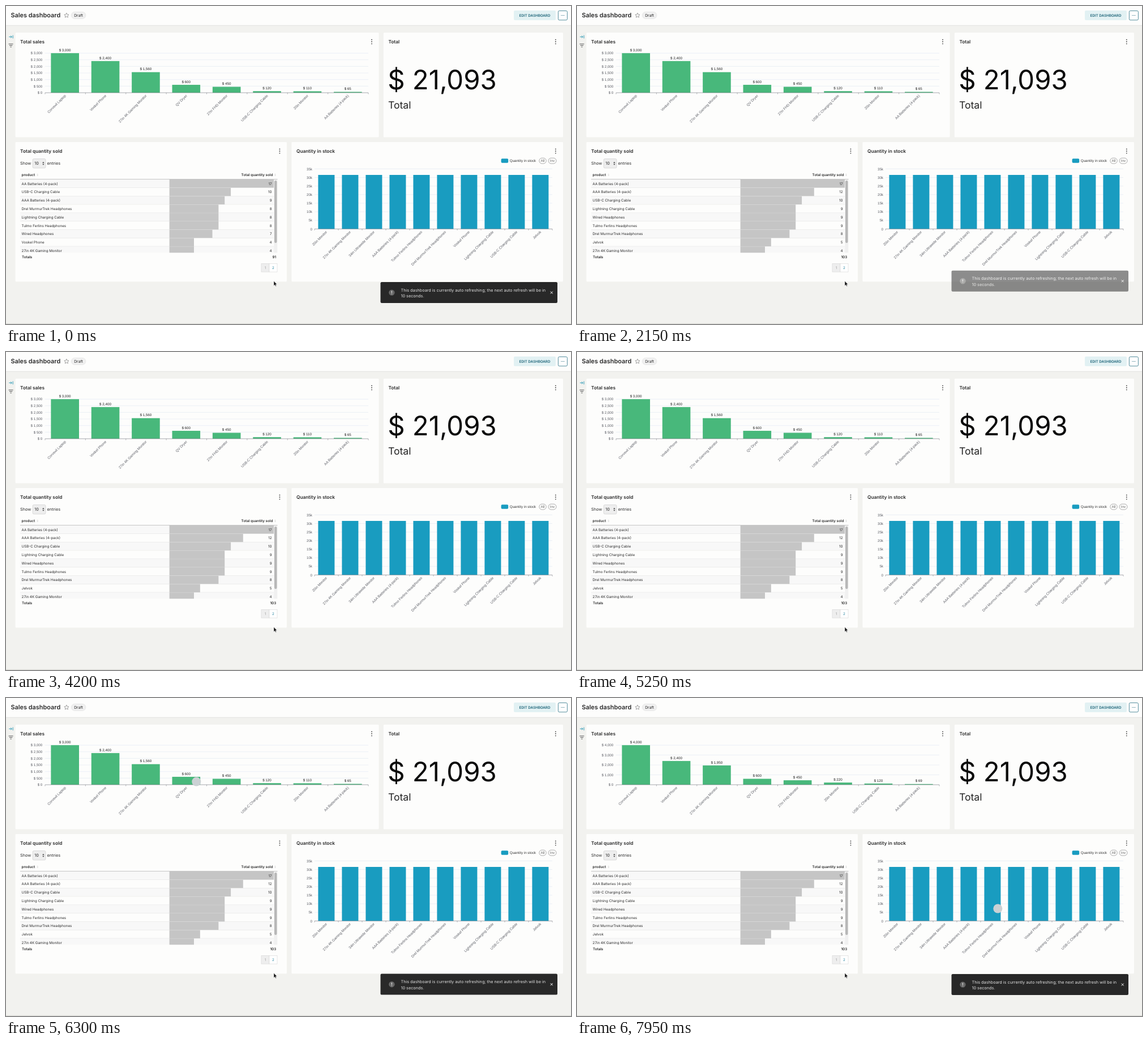
An HTML page that plays this animation: 998 px wide and 561 px high, repeating every 8000 ms.

```html
<!DOCTYPE html>
<html lang="en">
<head>
<meta charset="utf-8">
<title>Sales dashboard</title>
<style>
  html, body { margin: 0; width: 100%; height: 100%; overflow: hidden; background: #f2f2ef; }
  svg { display: block; width: 100vw; height: 100vh; }
  text { font-family: Inter, "Open Sans", sans-serif; font-optical-sizing: none; text-rendering: geometricPrecision; white-space: pre; }
  .chart { font-family: "Liberation Sans", Arial, sans-serif; }
</style>
</head>
<body>
<svg id="stage" viewBox="0 0 998 561" xmlns="http://www.w3.org/2000/svg">
  <g id="page"></g>
  <g id="sales"></g>
  <g id="table"></g>
  <circle id="spinner" r="8" fill="#cbd1d4"/>
  <g id="toast"></g>
  <path d="M473 485.3v8.3l1.9-1.7 1.3 2.7 1.3-.6-1.3-2.7h2.5z" fill="#111" stroke="#fff" stroke-width=".5"/>
</svg>
<script>
const LOOP = 8000;
const SMALL = 6.24, BASE = 7.28, HEAD = 8.32;
const INK = '#2b2b2b', AXIS = '#6e7079', TICK = '#5c5e66', GREEN = '#48b87b', BLUE = '#199cc0';
const PAGE = '#f2f2ef', PAPER = '#fdfdfc';
const $ = id => document.getElementById(id);

const rect = (x, y, w, h, fill, more = '') =>
  `<rect x="${x}" y="${y}" width="${w}" height="${h}" fill="${fill}" ${more}/>`;
const line = (x1, y1, x2, y2, color, width = .6) =>
  `<path d="M${x1} ${y1}L${x2} ${y2}" stroke="${color}" stroke-width="${width}" fill="none"/>`;
const path = (d, fill, more = '') => `<path d="${d}" fill="${fill}" ${more}/>`;
const dot = (x, y, r, fill) => `<circle cx="${x}" cy="${y}" r="${r}" fill="${fill}"/>`;

// Text centred vertically on cy
const text = (x, cy, s, size = SMALL, { fill = INK, weight = 400, anchor = 'start', more = '' } = {}) =>
  `<text x="${x}" y="${cy + size * .36}" font-size="${size}" font-weight="${weight}" fill="${fill}" text-anchor="${anchor}" ${more}>${s}</text>`;
const label = (x, cy, s, anchor, fill = TICK, more = '') =>
  text(x, cy, s, SMALL, { fill, anchor, more: 'class="chart" ' + more });
const slanted = (x, y, s) => label(x, y, s, 'end', TICK, `transform="rotate(-45 ${x} ${y})"`);

const kebab = (x, y) => [-3.6, 0, 3.6].map(d => dot(x, y + d, .95, '#444')).join('');
const card = (x, y, w, h, title) =>
  rect(x, y, w, h, PAPER, 'rx="1.5"') +
  text(x + 8.6, y + 16.2, title, HEAD, { weight: 600 });

function star(cx, cy, r) {
  const pts = Array.from({ length: 10 }, (_, i) => {
    const a = Math.PI * (i / 5 - .5), d = i % 2 ? r * .48 : r;
    return `${(cx + d * Math.cos(a)).toFixed(2)},${(cy + d * Math.sin(a)).toFixed(2)}`;
  });
  return `<polygon points="${pts.join(' ')}" fill="none" stroke="#777" stroke-width=".7" stroke-linejoin="round"/>`;
}

const sorter = (x, y) =>
  path(`M${x - 1.1} ${y - .6}h2.2l-1.1-1.4zM${x - 1.1} ${y + .6}h2.2l-1.1 1.4z`, '#c4c4c4');

function header() {
  return rect(0, 0, 998, 34, PAPER) +
    line(0, 34.3, 998, 34.3, '#dfdfdd', .8) +
    text(8.4, 16.4, 'Sales dashboard', 10.92, { weight: 600 }) +
    star(106.9, 16.6, 4.3) +
    rect(115.3, 10.4, 25.6, 12, '#f0f0f0', 'rx="6" stroke="#dadada" stroke-width=".5"') +
    text(128.1, 16.4, 'Draft', 6.76, { anchor: 'middle' }) +
    rect(897, 8, 74, 17, '#e2f1f3', 'rx="2"') +
    text(934, 16.4, 'EDIT DASHBOARD', SMALL, { weight: 600, fill: '#1b6377', anchor: 'middle' }) +
    rect(975.4, 8.5, 16, 16.3, '#fff', 'rx="2" stroke="#2a7186" stroke-width=".8"') +
    [-2.3, 0, 2.3].map(d => dot(983.4 + d, 16.6, .65, '#1b6377')).join('');
}

function sidebar() {
  return path('M5.2 54.4h5M8.2 52.4l2.1 2-2.1 2M12.2 51.6v5.6', 'none', 'stroke="#2497b5" stroke-width=".9"') +
    [[4, -2.6], [2.7, 0], [1.2, 2.6]].map(([w, d]) => line(8.6 - w, 69.6 + d, 8.6 + w, 69.6 + d, '#444', .9)).join('');
}

function stockChart() {
  const names = ['20in Monitor', '27in 4K Gaming Monitor', '34in Ultrawide Monitor', 'AAA Batteries (4-pack)',
    'Tulmo Ferlins Headphones', 'Drel MurmurTrek Headphones', 'Voskel Phone', 'Lightning Charging Cable',
    'USB-C Charging Cable', 'Jelvok'];
  const left = 545, right = 965, base = 393.3, step = 42;
  let s = rect(874.6, 269.2, 12.6, 7.6, BLUE, 'rx="1.8"') +
    label(889.8, 273.1, 'Quantity in stock', 'start', '#333');
  for (const [x, w, name] of [[948, 12.4, 'All'], [965, 14, 'Inv']])
    s += rect(x - w / 2, 268.2, w, 9.8, 'none', 'rx="4.9" stroke="#777" stroke-width=".6"') +
      label(x, 273.1, name, 'middle', '#666');
  for (let i = 0; i <= 7; i++) {
    const y = base - i * 15.13;
    if (i) s += line(left, y, right, y, '#e0e6f1');
    s += label(541, y, i ? i * 5 + 'k' : '0', 'end');
  }
  names.forEach((name, i) => {
    const x = left + step * (i + .5);
    s += rect(x - 14.6, 298, 29, base - 298, BLUE) + slanted(x, base + 4.2, name);
  });
  s += line(left, base, right, base, AXIS);
  for (let i = 0; i <= 10; i++) s += line(left + i * step, base, left + i * step, base + 2.6, AXIS, .5);
  return s;
}

function tableFrame() {
  return text(25, 277.5, 'Show', BASE) +
    rect(47.2, 269.6, 22.8, 16.3, '#eeeeee', 'rx="2" stroke="#c8c8c8" stroke-width=".6"') +
    text(50.2, 277.8, '10', BASE) +
    path('M64.2 277.1h3.4l-1.7-2.3zM64.2 278.5h3.4l-1.7 2.3z', '#444') +
    text(72.6, 277.5, 'entries', BASE) +
    text(27.6, 297.9, 'product', SMALL, { weight: 600 }) + sorter(55.8, 297.9) +
    text(471.3, 297.9, 'Total quantity sold', SMALL, { weight: 600, anchor: 'end' }) + sorter(475.6, 297.9) +
    text(28, 443, 'Totals', SMALL, { weight: 600 }) +
    rect(451, 454.3, 14, 14.8, '#eeeeee', 'stroke="#d5d5d5" stroke-width=".6"') +
    rect(465, 454.3, 14, 14.8, '#fff', 'stroke="#d5d5d5" stroke-width=".6"') +
    text(458, 461.7, '1', SMALL, { fill: '#999', anchor: 'middle' }) +
    text(472, 461.7, '2', SMALL, { fill: '#2483a0', anchor: 'middle' });
}

function tableRows({ rows, total }) {
  const top = 306, pitch = 14.78;
  let s = '<clipPath id="body"><rect x="25" y="305" width="455" height="130.3"/></clipPath><g clip-path="url(#body)">';
  rows.forEach(([name, n], i) => {
    const y = top + i * pitch, mid = y + 7.4;
    s += rect(25, y, 448.5, pitch, i % 2 ? PAPER : '#f8f8f8') +
      rect(288.6, y, n * 10.85, pitch, '#c5c5c5') +
      line(25, y + pitch, 473.5, y + pitch, '#d0d0d0', .6) +
      text(27.6, mid, name) + text(469.5, mid, n, SMALL, { anchor: 'end' });
  });
  return s + rect(473.4, top, 5.8, 130, '#f0f0f0') + rect(474, 308, 4.5, 110, '#b8b8b8', 'rx="2.2"') + '</g>' +
    line(25, 305.6, 479.5, 305.6, '#b5b5b5', .8) +
    text(477.2, 443, total, SMALL, { weight: 600, anchor: 'end' });
}

const TABLES = [
  { total: 91, rows: [['AA Batteries (4-pack)', 17], ['USB-C Charging Cable', 10], ['AAA Batteries (4-pack)', 9],
    ['Drel MurmurTrek Headphones', 8], ['Lightning Charging Cable', 8], ['Tulmo Ferlins Headphones', 8],
    ['Wired Headphones', 7], ['Voskel Phone', 4], ['27in 4K Gaming Monitor', 4]] },
  { total: 103, rows: [['AA Batteries (4-pack)', 17], ['AAA Batteries (4-pack)', 12], ['USB-C Charging Cable', 10],
    ['Lightning Charging Cable', 9], ['Wired Headphones', 9], ['Tulmo Ferlins Headphones', 9],
    ['Drel MurmurTrek Headphones', 8], ['Jelvok', 5], ['27in 4K Gaming Monitor', 4]] }
];

const LEADERS = ['Corvexil Laptop', 'Voskel Phone', '27in 4K Gaming Monitor', 'QV Dryer', '27in FHD Monitor'];
const SALES = [
  { max: 3000, tick: 500, values: [3000, 2400, 1560, 600, 450, 120, 110, 65],
    names: [...LEADERS, 'USB-C Charging Cable', '20in Monitor', 'AA Batteries (4-pack)'] },
  { max: 4000, tick: 1000, values: [4000, 2400, 1950, 600, 450, 220, 120, 69],
    names: [...LEADERS, '20in Monitor', 'USB-C Charging Cable', 'AA Batteries (4-pack)'] }
];
const money = n => '$ ' + n.toLocaleString('en-US');

// k blends the bar heights from the first data set to the second
function salesChart(k) {
  const left = 69, right = 640, base = 153, height = 69.8, step = (right - left) / 8;
  const data = SALES[k > 0 ? 1 : 0];
  let s = '';
  for (let v = 0; v <= data.max; v += data.tick) {
    const y = base - height * v / data.max;
    if (v) s += line(left, y, right, y, '#e0e6f1');
    s += label(64.3, y, money(v), 'end');
  }
  data.names.forEach((name, i) => {
    const [a, b] = SALES.map(d => d.values[i] / d.max);
    const x = left + step * (i + .5), h = height * (a + (b - a) * k);
    s += rect(x - 25.3, base - h, 49.6, h, GREEN) +
      label(x - .6, base - h - 5.6, money(data.values[i]), 'middle', '#222') +
      slanted(x, base + 4.2, name);
  });
  s += line(left, base, right, base, AXIS);
  for (let i = 0; i <= 8; i++) s += line(left + i * step, base, left + i * step, base + 2.6, AXIS, .5);
  return s;
}

function toast() {
  const ink = { fill: '#e2e2e2' };
  return rect(661.5, 487, 312.5, 37, '#282828', 'rx="2.2"') +
    dot(681.4, 505.6, 5.2, '#666') +
    rect(680.85, 502.6, 1.1, 3.7, '#eee') + dot(681.4, 507.9, .65, '#eee') +
    text(697.5, 501, 'This dashboard is currently auto refreshing; the next auto refresh will be in', BASE, ink) +
    text(697.5, 511.5, '10 seconds.', BASE, ink) +
    path('M961.7 503.6l4 4M965.7 503.6l-4 4', 'none', 'stroke="#fff" stroke-width="1"');
}

const clamp = x => Math.min(1, Math.max(0, x));
const inOut = x => x < .5 ? 4 * x ** 3 : 1 - (2 - 2 * x) ** 3 / 2;

// CSS "ease": cubic-bezier(.25, .1, .25, 1)
function ease(x) {
  if (x <= 0 || x >= 1) return clamp(x);
  const bez = (u, a, b) => 3 * (1 - u) ** 2 * u * a + 3 * (1 - u) * u * u * b + u ** 3;
  let lo = 0, hi = 1;
  for (let i = 0; i < 24; i++) {
    const u = (lo + hi) / 2;
    if (bez(u, .25, .25) < x) lo = u; else hi = u;
  }
  return bez(lo, .1, 1);
}

const SPINS = [
  { from: 1000, to: 1300, x: 256.3, y: 371.5 },
  { from: 6050, to: 6350, x: 336.3, y: 147.6 },
  { from: 7850, to: 8000, x: 743.3, y: 371.5 }
];
const TABLE_AT = 1300, SALES_AT = 6350, TOAST_OUT = 2067, TOAST_IN = 6040, TOAST_RISE = 43;

$('page').innerHTML =
  rect(0, 0, 998, 561, PAGE) + line(0, 560.4, 998, 560.4, '#d6d6d0', .9) + header() + sidebar() +
  card(16.5, 47, 642, 184.5, 'Total sales') + kebab(646, 63) +
  card(666.8, 47, 317.2, 184.5, 'Total') + kebab(970.8, 63) +
  card(16.5, 240, 479.5, 246.3, 'Total quantity sold') + kebab(483.4, 256) +
  card(504.4, 240, 479.6, 246.3, 'Quantity in stock') + kebab(970.8, 256) +
  text(674.2, 130.4, '$ 21,093', 47.3, { fill: '#0a0a0a' }) +
  text(675, 174.8, 'Total', 17.6, { fill: '#222' }) +
  stockChart() + tableFrame();
$('toast').innerHTML = toast();

const drawn = {};
function show(id, key, build) {
  if (drawn[id] === key) return;
  drawn[id] = key;
  $(id).innerHTML = build(key);
}

function render(t) {
  show('table', t < TABLE_AT ? 0 : 1, i => tableRows(TABLES[i]));
  show('sales', inOut(clamp((t - SALES_AT) / 300)), salesChart);

  const spin = SPINS.find(s => t >= s.from && t < s.to);
  const spinner = $('spinner');
  spinner.setAttribute('visibility', spin ? 'visible' : 'hidden');
  if (spin) {
    spinner.setAttribute('cx', spin.x);
    spinner.setAttribute('cy', spin.y);
  }

  const shown = t < TOAST_IN ? 1 - ease((t - TOAST_OUT) / 300) : ease((t - TOAST_IN) / 300);
  $('toast').setAttribute('opacity', shown);
  $('toast').setAttribute('transform', `translate(0 ${-TOAST_RISE * (1 - shown)})`);
}

const start = performance.now();
function tick() {
  render((performance.now() - start) % LOOP);
  requestAnimationFrame(tick);
}
tick();
</script>
</body>
</html>
```
